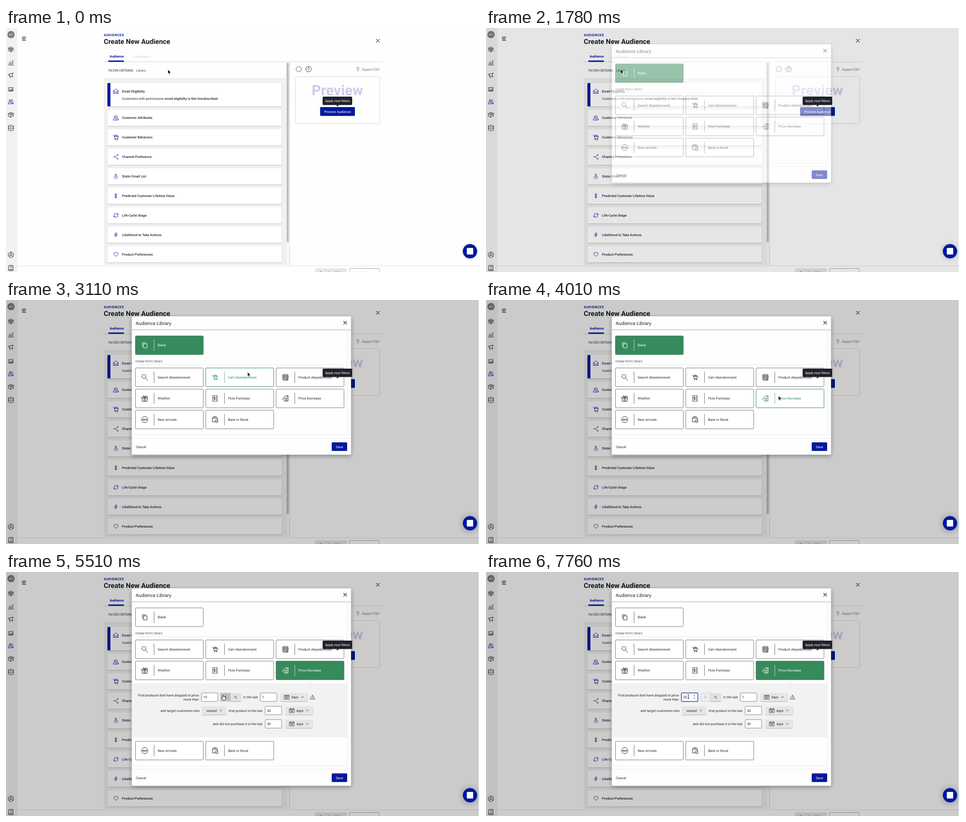
These frames come from a looping animation (1042 px wide and 537 px high, 8000 ms). An HTML page:

```html
<!DOCTYPE html>
<html lang="en">
<head>
<meta charset="utf-8">
<title>Audience Library</title>
<style>
html, body { margin: 0; width: 100%; height: 100%; overflow: hidden; background: #fff; }
svg { display: block; width: 100%; height: 100%; }
text { font-family: Roboto, "Open Sans", sans-serif; text-rendering: geometricPrecision; white-space: pre; }
.icon { fill: none; stroke: currentColor; stroke-linejoin: round; stroke-linecap: round; }
.card { filter: drop-shadow(0 1px 1px rgba(0,0,0,.2)); }
.raised { filter: drop-shadow(0 1px .7px rgba(0,0,0,.28)); }
.dialog { filter: drop-shadow(0 3px 5px rgba(0,0,0,.35)); }
.chat { filter: drop-shadow(0 1px 3px rgba(0,0,0,.18)); }
.tile { color: #26272b; }
.tile .box { fill: #fff; stroke: #777; }
.tile.hover { color: #2f8a58; }
.tile.hover .box { stroke: #2f8a58; }
.tile.on { color: #fff; }
.tile.on .box { fill: #378a5c; stroke: #2f7a50; }
</style>
</head>
<body>
<svg id="stage" viewBox="0 0 1042 537" preserveAspectRatio="none"></svg>
<script>
const NAVY = '#03199c', INK = '#26272b', LOOP = 8000, GROW = 130;

const ICONS = {
  cube: 'M0-5.5L5-2.7V2.8L0 5.5-5 2.8V-2.7ZM-5-2.7L0 0 5-2.7M0 0V5.5M-2.5-1.3V1.3L0 2.7 2.5 1.3V-1.3L0-2.7Z',
  bars: 'M-5.5 5.5H5.5M-4 3.5V1M-1.3 3.5V-2M1.4 3.5V-.5M4.2 3.5V-5.5',
  flag: 'M-5-2L5-5 2.5 0 4.5 3.5-2 2ZM-4.5-2L-1 5.8',
  image: 'M-4.5-4H4.5V4H-4.5ZM-3.5 2.5L-1-.5.8 1.3 2 .2 3.7 2.5ZM1.6-1.6h.8',
  people: 'M-3.7-2.2a2 2.3 0 1 0 4 0a2 2.3 0 1 0-4 0M-5.7 4.5V3.2Q-5.2 1.5-3 1H-.4Q1.8 1.5 2.3 3.2V4.5ZM1.2-4.4A2 2.3 0 1 1 2 .1M3 1Q5.2 1.5 5.7 3.2V4.5H2.3',
  parcel: 'M-5.5-2.5L.5-5.5 5.5-3V2.5L-.5 5.5-5.5 3ZM-5.5-2.5L-.5 0 5.5-3M-.5 0V5.5M-2.6-4L2.6-1.4V1.2',
  store3: 'M-5.5-4a5.5 2 0 1 0 11 0a5.5 2 0 1 0-11 0V4a5.5 2 0 0 0 11 0V-4M-5.5 0a5.5 2 0 0 0 11 0',
  user: 'M-6 0a6 6 0 1 0 12 0a6 6 0 1 0-12 0M-2.2-1.3a2.2 2.6 0 1 0 4.4 0a2.2 2.6 0 1 0-4.4 0M-4 4Q-3.4 2-1 1.5M4 4Q3.4 2 1 1.5',
  book: 'M-4-5.5H4.5V6H-4Q-5 6-5 5V-4.5Q-5-5.5-4-5.5M-5 4H4.5M-1.6-2A1.7 1.7 0 1 1 .5-.4Q0-.2 0 .8M0 2.3v.1',
  mail: 'M-5-1L0-5 5-1V5H-5ZM-5-1L0 2.5 5-1M-5 5L-1.5 1.5M5 5L1.5 1.5',
  cart: 'M-6-4.5H-4.2L-2.2 2.4H4.2L5.5-2H-3.3M-1.5-2V-5H1.3V-2M1.3-3.8H3.7V-2M-2.2 4.7a1 1 0 1 0 2 0a1 1 0 1 0-2 0M2.4 4.7a1 1 0 1 0 2 0a1 1 0 1 0-2 0',
  branch: 'M-5.3 0H-1.2L3.4-3.8M-1.2 0L3.4 3.8M3.3-4.4a.9.9 0 1 0 1.8 0a.9.9 0 1 0-1.8 0M3.3 4.4a.9.9 0 1 0 1.8 0a.9.9 0 1 0-1.8 0',
  upload: 'M-2-1A3.4 3.4 0 1 0 2-1M0 2V-5M-2.2-3L0-5.2 2.2-3',
  dollar: 'M2.3-2.3Q2-3.8 0-3.8T-2.3-2Q-2.2-.4 0 0T2.4 2Q2.2 3.8 0 3.8T-2.4 2.3M0-5.3V5.3',
  cycle: 'M-4.3-.8A4.3 4.3 0 0 1 4-1.5M4.6-4V-1.2H1.8M4.3.8A4.3 4.3 0 0 1-4 1.5M-4.6 4V1.2H-1.8',
  bolt: 'M1-5L-3.5.8H0L-1 5 3.5-1H0Z',
  heart: 'M0 4.6L-4.3.3A2.8 2.8 0 0 1 0-3.2A2.8 2.8 0 0 1 4.3.3Z',
  copy: 'M-2.5-3H5V6H-2.5ZM-5 3.3V-5.5H2.6',
  search: 'M-6.3-2a4.4 4.4 0 1 0 8.8 0a4.4 4.4 0 1 0-8.8 0M1.4 1.2L6.5 6.4',
  shop: 'M-5.5-6H5.5V-3.7H-5.5ZM-5.5-3.7L-6.5-.6H6.5L5.5-3.7M-3-3.7L-3.4-.6M0-3.7V-.6M3-3.7L3.4-.6M-5.5-.6V6.3H5.5V-.6M-3.5 1.5H0V4H-3.5ZM1.8 6.3V1.5H4V6.3',
  gift: 'M-6.3-3H6.3V0H-6.3ZM-5.5 0V6.5H5.5V0M-1.3-3V6.5M1.3-3V6.5M0-3Q-4.5-3.4-3.6-5.5T0-3Q4.5-3.4 3.6-5.5T0-3',
  receipt: 'M-4.5-6.5L-3-5.7-1.5-6.5 0-5.7 1.5-6.5 3-5.7 4.5-6.5V6.5L3 5.7 1.5 6.5 0 5.7-1.5 6.5-3 5.7-4.5 6.5ZM-.3-2.7H-2.3V-.3H-.5V2H-2.5M-1.4-3.6V3M1.5-2.5H2.7M1.5 0H2.7M1.5 2.5H2.7',
  tag: 'M-6.7 1L.8-6H6V-1M-6.7 1L-1.5 6.3M3.3-4a.7.7 0 1 0 1.4 0a.7.7 0 1 0-1.4 0M-1 3a3.7 3.7 0 1 0 7.4 0a3.7 3.7 0 1 0-7.4 0M2.7.8V5M1.2 3.6L2.7 5.1 4.2 3.6M-3 .8L0-2',
  fresh: 'M-6.8 0a6.8 6.8 0 1 0 13.6 0a6.8 6.8 0 1 0-13.6 0',
  stock: 'M-1 5H-6V-3L-4-6.3H3L5-3V0M-6-3H5M-.5-6.3V-3M-.2 3.5a3.3 3.3 0 1 0 6.6 0a3.3 3.3 0 1 0-6.6 0M1.5 3.6L2.7 4.8 4.8 2.4',
  close: 'M-3.4-3.4L3.4 3.4M3.4-3.4L-3.4 3.4',
  menu: 'M-4-3.3H4M-4 0H2.5M-4 3.3H4',
  help: 'M-6 0a6 6 0 1 0 12 0a6 6 0 1 0-12 0M-1.8-1.6A1.8 1.8 0 1 1 .6.1Q0 .4 0 1.4M0 3.1v.1',
  save: 'M-2.2 0A2.6 2.6 0 1 1 2.4 0M0-2V4.6M-1.8 3L0 4.8 1.8 3',
  calendar: 'M-5-4H5V4.5H-5ZM-5-1.8H5M-2.5-5V-3M2.5-5V-3M-2 .3H2V2.4H-2Z',
  down: 'M-2-1L0 1 2-1',
  warn: 'M0-4.8L5.2 4.3H-5.2ZM0-1.5V1.6M0 2.9v.1',
  spin: 'M-1.7-2L0-3.7 1.7-2M-1.7 2L0 3.7 1.7 2'
};

const text = (s, x, y, size = 7.45, fill = INK, extra = '') =>
  `<text x="${x}" y="${y}" font-size="${size}" fill="${fill}" ${extra}>${s}</text>`;
const rect = (x, y, w, h, fill, extra = '') =>
  `<rect x="${x}" y="${y}" width="${w}" height="${h}" fill="${fill}" ${extra}/>`;
const icon = (name, x, y, color = 'currentColor', width = .9, scale = 1) =>
  `<path class="icon" d="${ICONS[name]}" transform="translate(${x} ${y}) scale(${scale})" style="color:${color}" stroke-width="${width}"/>`;
const MID = 'text-anchor="middle"', END = 'text-anchor="end"', BOLD = 'font-weight="700"', MEDIUM = 'font-weight="500"';

function sidebar() {
  const items = [['cube', 47], ['bars', 76], ['flag', 104], ['image', 135], ['people', 162, NAVY],
    ['parcel', 191], ['store3', 220], ['user', 499], ['book', 528]];
  return rect(0, 0, 25, 537, '#f1f1f1') +
    '<circle cx="11" cy="14.5" r="8" fill="#7c7c7c"/>' + text('BD', 11, 17, 6.6, '#e4e4e4', MID) +
    items.map(([n, y, c]) => icon(n, 10.8, y, c || INK, 1)).join('') +
    icon('menu', 39.7, 23.5, '#111', 1.3);
}

function filterCards() {
  const rows = [['people', 'Customer Attributes'], ['cart', 'Customer Behaviors'], ['branch', 'Channel Preference'],
    ['upload', 'Static Email List'], ['dollar', 'Predicted Customer Lifetime Value'], ['cycle', 'Life-Cycle Stage'],
    ['bolt', 'Likelihood to Take Actions'], ['heart', 'Product Preferences']];
  return rect(223, 121, 383.5, 51.5, '#fff', 'rx="2" class="card"') +
    `<path d="M229.5 121V172.5H225Q223 172.5 223 170.5V123Q223 121 225 121Z" fill="${NAVY}"/>` +
    icon('mail', 241.5, 139, NAVY) + text('Email Eligibility', 255, 141.7, 7.4, INK, MEDIUM) +
    text('Customers with permissions', 255, 157.8, 7.25) +
    text('email eligibility is Not Unsubscribed.', 349, 157.8, 7.25, INK, MEDIUM) +
    rows.map(([n, label], i) => {
      const y = 197.8 + i * 42.88;
      return rect(223, y - 18, 383.5, 35.7, '#fff', 'rx="2" class="card"') +
        icon(n, 241.5, y, NAVY) + text(label, 255, y + 2.6, 7.4, INK, MEDIUM);
    }).join('');
}

function page() {
  return rect(0, 0, 1042, 537, '#fefefe') + sidebar() +
    text('AUDIENCES', 215, 17.8, 7.3, NAVY, BOLD + ' letter-spacing=".6"') +
    text('Create New Audience', 215, 35.3, 15.1, '#1d1e22', BOLD) +
    icon('close', 817.5, 28, INK, 1.1) +
    text('Audience', 228, 64.5, 7.36, NAVY, BOLD) + text('Campaigns', 280, 64.5, 7.2, '#cfcfcf') +
    rect(215, 74, 613, 1, '#d2d2d2') + rect(225, 71.5, 34, 3, NAVY) +
    text('FILTER CRITERIA', 225, 96, 7.3) +
    text('Library', 286, 96, 7.25, '#4a4b52', 'font-style="italic" id="library"') +
    rect(215, 111, 400.5, 411, '#f1f1f1') + rect(215, 111, 400.5, 1, '#e2e2e2') + filterCards() +
    rect(615.5, 75, 8, 447, '#f8f8f8') + rect(615, 75, .7, 447, '#e2e2e2') +
    rect(617, 76.5, 4.6, 395, '#bdbdbd', 'rx="2.3"') + rect(623, 75, 1, 447, '#d2d2d2') +
    `<circle cx="643.5" cy="90.5" r="6" fill="none" stroke="#666" stroke-width="1.1" stroke-dasharray="1.6 .75"/>
     <circle cx="643.5" cy="90.5" r="4.8" fill="none" stroke="#999" stroke-width=".5"/>` +
    icon('help', 665, 90.5, '#333', 1) + icon('save', 773.5, 90, '#777') +
    text('Export CSV', 783, 93.6, 7.6, '#6c6c6c') +
    rect(636.5, 107, 184.5, 103.5, 'none', 'rx="3" stroke="#b9bbe3" stroke-dasharray="2.6 1.6"') +
    text('Preview', 728.5, 148, 31.5, '#cccdea', MID + ' ' + BOLD) +
    rect(690.5, 174, 76.5, 19.5, NAVY, 'rx="2"') + text('Preview Audience', 728.7, 186.7, 7.45, '#fff', MID) +
    rect(25, 523, 1017, 1, '#e2e2e2') + rect(25, 524, 1017, 13, '#fff') +
    rect(679, 529, 70, 20, '#e6e6e6', 'rx="2"') + text('Cancel and Exit', 714, 540.6, 7.3, INK, MID) +
    rect(755, 529.3, 66, 20, '#fff', 'rx="2" stroke="#8d8d8d" stroke-width=".8"') +
    text('Save Audience', 788, 540.6, 7.3, '#999', MID);
}

const COLS = [284.5, 439.2, 593.8], TILE_W = 149.2, TILE_H = 41;
const TILES = [
  ['copy', 'Blank', 0, 79], ['search', 'Search Abandonment', 0, 149.6], ['cart', 'Cart Abandonment', 1, 149.6],
  ['shop', 'Product Abandonment', 2, 149.6], ['gift', 'Wishlist', 0, 196.1], ['receipt', 'Post Purchase', 1, 196.1],
  ['tag', 'Price Decrease', 2, 196.1], ['fresh', 'New Arrivals', 0, 242.6], ['stock', 'Back in Stock', 1, 242.6]
].map(([glyph, label, col, y], i) => ({ glyph, label, x: COLS[col], y, low: i > 6 }));

function tile({ glyph, label, x, y }) {
  const mid = y + TILE_H / 2;
  return `<g class="tile"><rect class="box" x="${x}" y="${y}" width="${TILE_W}" height="${TILE_H}" rx="1.5"/>` +
    icon(glyph, x + 20.5, mid, 'inherit', 1) +
    (glyph === 'fresh' ? text('NEW', x + 20.5, mid + 1.6, 4.5, 'currentColor', MID + ' font-weight="900"') : '') +
    rect(x + 40.6, y + 8, .9, 25, 'currentColor', 'opacity=".75"') +
    text(label, x + 49, mid + 2.6, 7.45, 'currentColor') + '</g>';
}

const field = (x, y, value, id = '') =>
  rect(x, y, 36.3, 18.6, '#fff', `rx="1.5" stroke="#777" stroke-width=".9" ${id && `id="${id}Box"`}`) +
  text(value, x + 4, y + 11.9, 7.45, INK, id && `id="${id}"`);
const days = (x, y) => rect(x, y, 60.5, 18.6, '#e5e5e5', 'rx="1.5" class="raised"') +
  icon('calendar', x + 14.3, y + 9.3, INK, .8) + text('days', x + 24.3, y + 11.9) + icon('down', x + 48.7, y + 9.2, INK, 1);

function settings() {
  return rect(276.8, 245, 473.4, 119, '#f2f2f2') + '<path d="M663 245.2L668 240.2 673 245.2Z" fill="#f2f2f2"/>' +
    text('Find products that have dropped in price', 424, 274, 7.53, INK, END) + text('more than', 424, 282.6, 7.5, INK, END) +
    field(429.5, 266.2, '10', 'amount') +
    `<g id="spin">${icon('spin', 458, 275.2, '#333', 1)}</g>` + rect(441.3, 270, .9, 10, '#111', 'id="caret"') +
    rect(471.3, 266.2, 22, 18.6, '#ececec', 'id="unit" stroke="#cfcfcf" stroke-width=".8"') +
    text('$', 482, 278.2, 7.4, '#999', MID + ' id="unitSign"') +
    rect(493.5, 266.2, 23, 18.6, '#e1e1e1', 'rx="1" class="raised"') + text('%', 505, 278.2, 7.4, INK, MID) +
    text('in the last', 553.5, 278.1, 7.45, INK, END) + field(559.2, 266.2, '1') + days(603, 266.2) +
    icon('warn', 674, 275.5, '#333', .9) +
    text('and target customers who', 426, 307.5, 7.45, INK, END) +
    rect(431.3, 295.6, 52.8, 18.6, '#e5e5e5', 'rx="1.5" class="raised"') +
    text('viewed', 440, 307.5) + icon('down', 472.5, 304.7, INK, 1) +
    text('that product in the last', 564, 307.5, 7.45, INK, END) + field(569.7, 295.6, '30') + days(614, 295.6) +
    text('and did not purchase it in the last', 564, 336.8, 7.45, INK, END) + field(569.7, 324.9, '30') + days(614, 324.9);
}

function dialog() {
  return rect(276.5, 36, 482, 304.5, '#fefefe', 'rx="2.5" class="dialog" id="sheet"') +
    text('Audience Library', 285, 54.5, 10.55, INK) + icon('close', 745.5, 50, INK, 1.2) +
    rect(276.5, 65, 482, 1.2, '#b5b5b5') + rect(750, 67, .8, 230, '#e4e4e4', 'id="edge"') +
    text('Create from Library', 284.5, 137.2, 6.93, '#444') + rect(284.5, 142, 458.5, .7, '#e4e4e4') +
    TILES.filter(t => !t.low).map(tile).join('') + `<g id="settings">${settings()}</g>` +
    '<g id="low">' + TILES.filter(t => t.low).map(tile).join('') +
    rect(276.5, 296.6, 474, .8, '#e4e4e4') + rect(276.5, 304, 482, .8, '#e6e6e6') +
    text('Cancel', 285.5, 325.6) + rect(716, 313.3, 34, 19, NAVY, 'rx="2"') +
    text('Save', 733, 325.6, 7.45, '#fff', MID) + '</g>';
}

const pointers = `<g id="arrow"><path d="M0 0V9.2L2.1 7.4 3.5 10.7 5 10.1 3.6 6.8H6.4Z" fill="#000" stroke="#fff" stroke-width=".6"/></g>
<g id="hand"><path d="M-.9 5V.8Q-.9 0 0 0T.9.8V3.4Q2 2.9 2.6 3.7 3.7 3.3 4.1 4.2 5.3 4 5.3 5.2V7.2Q5.3 9.6 3.6 10.4H.3L-3.1 6.6Q-3.1 5.2-1.8 5.6L-.9 6.6Z" fill="#fff" stroke="#000" stroke-width=".8"/></g>
<g id="beam"><path d="M-2-4.6Q0-4.6 0-3.6Q0-4.6 2-4.6M0-3.6V3.6M-2 4.6Q0 4.6 0 3.6Q0 4.6 2 4.6M-1 1.6H1" fill="none" stroke="#111" stroke-width=".9"/></g>`;

document.getElementById('stage').innerHTML = page() +
  '<g id="modal">' + rect(0, 0, 1039, 537, '#000', 'opacity=".2"') +
  '<circle cx="1020" cy="491" r="25" fill="#000" opacity=".05"/>' + dialog() + '</g>' +
  rect(696, 151, 65, 18.6, '#20212a', 'rx="2"') + '<path d="M725.7 169.4H732.1L728.9 172.8Z" fill="#20212a"/>' +
  text('Apply new filters', 728.5, 163, 7.45, '#fff', MID) +
  `<g class="chat"><circle cx="1020" cy="491.3" r="15.8" fill="${NAVY}"/></g>` +
  rect(1013, 484, 14, 14.6, '#fff', 'rx="1.5"') + pointers;

const $ = id => document.getElementById(id);
const tileNodes = document.querySelectorAll('.tile');

// start, end, number of steps, then where the pointer arrives
const MOVES = [
  [590, 1030, 4, 296, 91], [2370, 3410, 8, 640, 190], [3560, 3710, 2, 643, 211],
  [4760, 5510, 6, 477, 271], [5660, 5660, 1, 445.5, 275], [5810, 5810, 1, 445, 274.5]
];
const FADE = [[0, 0], [1780, .5], [1930, 1]];
const TYPED = [[0, '10'], [6860, '1'], [7010, ''], [7160, '20']];
const CARET = [[0, 0], [6110, 1], [6560, 0], [6860, 1], [7760, 0]];
const OPEN = 4160, FOCUS = 6110;

const at = (steps, t) => steps.filter(s => s[0] <= t).pop()[1];
const ease = p => p * p * (3 - 2 * p);
const inside = (p, x, y, w, h) => p.x >= x && p.x <= x + w && p.y >= y && p.y <= y + h;
const show = (id, on) => $(id).setAttribute('visibility', on ? 'visible' : 'hidden');

function pointerAt(t) {
  let x = 356, y = 91.5;
  for (const [from, to, n, tx, ty] of MOVES) {
    if (t < from) break;
    const k = Math.min(n, 1 + Math.floor((t - from) / (to - from || 1) * (n - 1) + .001));
    const e = ease(k / n);
    x += (tx - x) * e;
    y += (ty - y) * e;
  }
  return { x, y };
}

function draw(t) {
  const p = pointerAt(t), fade = at(FADE, t), open = t >= OPEN, grow = open ? GROW : 0;
  $('library').setAttribute('fill', t >= 1030 ? '#18191d' : '#4a4b52');
  $('modal').setAttribute('opacity', fade);
  show('modal', fade > 0);
  $('sheet').setAttribute('height', 304.5 + grow);
  $('edge').setAttribute('height', 230 + grow);
  $('low').setAttribute('transform', `translate(0 ${grow})`);
  $('settings').style.display = open ? '' : 'none';

  TILES.forEach((tl, i) => {
    const on = tl.label === (open ? 'Price Decrease' : 'Blank');
    const over = fade === 1 && inside(p, tl.x, tl.y + (tl.low ? grow : 0), TILE_W, TILE_H);
    tileNodes[i].setAttribute('class', 'tile' + (on ? ' on' : over ? ' hover' : ''));
  });

  const overUnit = open && inside(p, 471, 266, 22, 19), overField = open && inside(p, 429, 266, 37, 19);
  $('unit').setAttribute('fill', overUnit ? '#bcbcbc' : '#ececec');
  $('unitSign').setAttribute('fill', overUnit ? INK : '#999');
  const value = at(TYPED, t);
  $('amount').textContent = value;
  $('amountBox').setAttribute('stroke', t >= FOCUS ? NAVY : '#777');
  $('amountBox').setAttribute('stroke-width', t >= FOCUS ? 1.2 : .9);
  $('spin').style.display = overField ? '' : 'none';
  $('caret').setAttribute('x', 433 + value.length * 4.15);
  $('caret').style.display = at(CARET, t) ? '' : 'none';

  const shape = overField ? 'beam' : overUnit ? 'hand' : 'arrow';
  for (const id of ['arrow', 'hand', 'beam']) show(id, id === shape);
  $(shape).setAttribute('transform', `translate(${p.x} ${p.y})`);
}

const start = performance.now();
function tick() {
  draw((performance.now() - start) % LOOP);
  requestAnimationFrame(tick);
}
tick();
</script>
</body>
</html>
```
